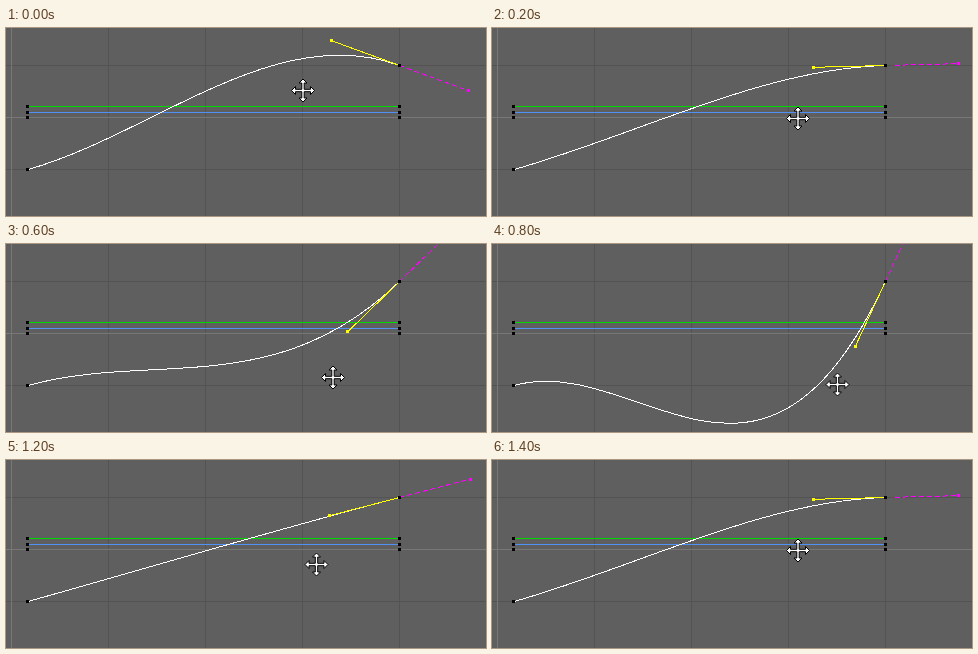
These frames come from a looping animation (480 by 188 pixels, 1600 ms). An HTML page:

```html
<!DOCTYPE html>
<html lang="en">
<head>
<meta charset="utf-8">
<title>Curve tangent</title>
<style>
html, body { margin: 0; width: 100%; height: 100%; overflow: hidden; background: #5f5f5f; }
svg { display: block; width: 480px; height: 188px; }
path { fill: none; stroke-width: 1; }
.crisp { shape-rendering: crispEdges; }
</style>
</head>
<body>
<svg viewBox="0 0 480 188">
  <rect width="480" height="188" fill="#5f5f5f"/>
  <g class="crisp">
    <path stroke="#535353" d="M102.5 0V188M199.5 0V188M296.5 0V188M393.5 0V188M0 37.5H480M0 141.5H480"/>
    <path stroke="#777" d="M5.5 0V188M0 89.5H480"/>
    <path stroke="#00d800" d="M22 78.5H393"/>
    <path stroke="#4f91f5" d="M22 84.5H393"/>
    <path id="curve" stroke="#fff"/>
    <path id="near" stroke="#ff0"/>
    <path id="far" stroke="#f0f" stroke-dasharray="5 3"/>
    <rect id="nearDot" width="3" height="3" fill="#ff0"/>
    <rect id="farDot" width="3" height="3" fill="#f0f"/>
    <path stroke="#000" style="stroke-width:3" d="M20 78.5h3M20 84.5h3M20 89.5h3M20 141.5h3M392 37.5h3M392 78.5h3M392 84.5h3M392 89.5h3"/>
  </g>
  <path id="cursor" fill="#fff" stroke="#000" stroke-linejoin="round" style="fill:#fff"
    d="M0-11.5L4-7.5H1.2V-1.2H7.5V-4L11.5 0L7.5 4V1.2H1.2V7.5H4L0 11.5L-4 7.5H-1.2V1.2H-7.5V4L-11.5 0L-7.5-4V-1.2H-1.2V-7.5H-4Z"/>
</svg>
<script>
const $ = id => document.getElementById(id);
const STEP = 200;
const start = { x: 22, y: 141.5 }, end = { x: 393.5, y: 37.5 };
const third = (end.x - start.x) / 3;
const startSlope = (end.y - start.y) / (end.x - start.x);

// Tangent slope at the end key, cursor position, bare length before the dashes
const poses = [
  { slope: -0.365, x: 297, y: 62.5, skip: 0 },
  { slope: 0.025, x: 306, y: 90.5, skip: 10 },
  { slope: 0.26, x: 310.5, y: 104.5, skip: 0 },
  { slope: 0.97, x: 327, y: 133.5, skip: 0 },
  { slope: 2.15, x: 345.5, y: 140.5, skip: 0 }
];

function along(slope, length) {
  const k = length / Math.hypot(1, slope);
  return { x: end.x + k, y: end.y - k * slope };
}

function segment(id, a, b) {
  $(id).setAttribute('d', `M${a.x} ${a.y}L${b.x} ${b.y}`);
}

function dot(id, p) {
  $(id).setAttribute('x', Math.floor(p.x) - 1);
  $(id).setAttribute('y', Math.floor(p.y) - 1);
}

function draw(time) {
  const step = Math.floor(time / STEP) % 8;
  const pose = poses[step < 5 ? step : 8 - step];
  const near = along(pose.slope, -72), far = along(pose.slope, 73.5);
  $('curve').setAttribute('d', `M${start.x} ${start.y}C${start.x + third} ${start.y + startSlope * third} ` +
    `${end.x - third} ${end.y + pose.slope * third} ${end.x} ${end.y}`);
  segment('near', near, end);
  segment('far', along(pose.slope, pose.skip), far);
  dot('nearDot', near);
  dot('farDot', far);
  $('cursor').setAttribute('transform', `translate(${pose.x} ${pose.y})`);
}

const origin = performance.now();
function tick() {
  draw(performance.now() - origin);
  requestAnimationFrame(tick);
}
tick();
</script>
</body>
</html>
```
